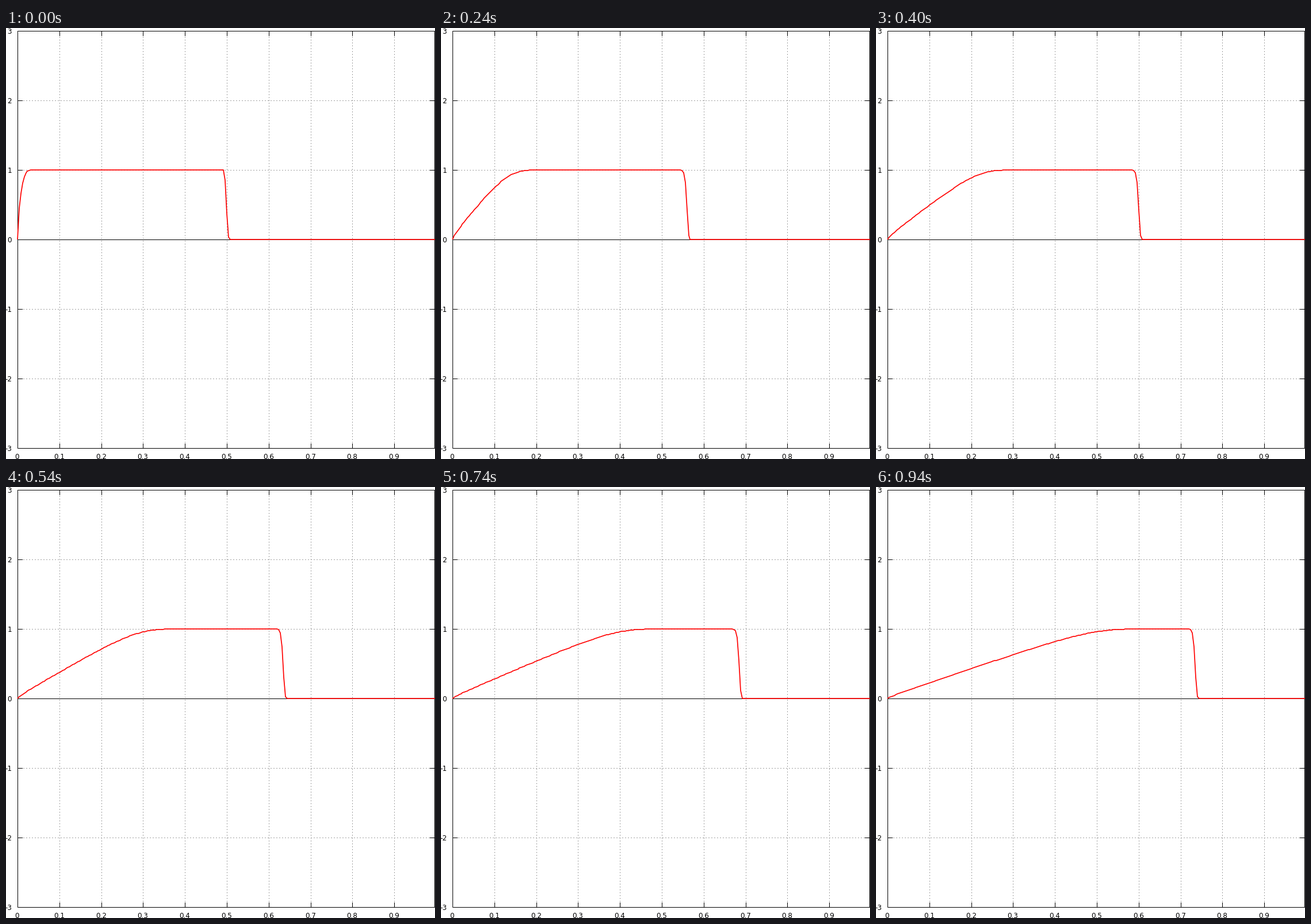
A matplotlib script that plays this animation: 746 by 750 pixels, repeating every 0.96 s.

```python
import numpy as np
import matplotlib.pyplot as plt
from matplotlib.animation import FuncAnimation

W, H, DPI = 746, 750, 100
LEFT, RIGHT, TOP, BOTTOM = 20, 745, 5, 731  # pixel columns and rows
HALF = 0.5  # from a pixel's index to its centre
PX = 72 / DPI  # points per pixel

N = 250
DX = 1 / N
DT = 0.0001
STEPS = 100  # solver steps per frame
FRAMES = 48
X_MAX = (N - 1) * DX


def to_px(x):
    return np.rint(LEFT + x / X_MAX * (RIGHT - LEFT))


def to_py(y):
    return np.rint(TOP + (3 - y) / 6 * (BOTTOM - TOP))


def solve():
    """Upwind solution of Burgers' equation, one row per frame."""
    u = np.zeros(N)
    u[1:124] = 1
    rows = []
    for _ in range(FRAMES):
        for _ in range(STEPS):
            u[1:] -= DT / DX * np.diff(u * u / 2)
        rows.append(u.copy())
    return rows


fig = plt.figure(figsize=(W / DPI, H / DPI), dpi=DPI, facecolor="white")
ax = fig.add_axes([0, 0, 1, 1])
ax.set_xlim(0, W)
ax.set_ylim(H, 0)
ax.axis("off")


def rule(xs, ys, color="black", cap="projecting", **style):
    ax.plot(np.array(xs) + HALF, np.array(ys) + HALF, color=color, lw=PX,
            snap=False, solid_capstyle=cap, dash_capstyle="butt", **style)


def label(x, y, text, ha):
    ax.text(x, y, text, ha=ha, va="baseline", color="black",
            family="DejaVu Sans", fontsize=12 * PX)


GRID = dict(color="#a0a0a0", linestyle=(0, (2, 3)), zorder=1)
TICK = 8

for i in range(10):
    x = to_px(i / 10)
    label(x - HALF, 750, f"{i / 10:g}", "center")
    if i:
        rule([x, x], [BOTTOM + HALF, TOP], **GRID)
        rule([x, x], [TOP, TOP + TICK])
        rule([x, x], [BOTTOM, BOTTOM - TICK])

for v in range(-3, 4):
    y = to_py(v)
    label(10, y + 5, str(v), "right")
    if abs(v) < 3:
        rule([LEFT - HALF, RIGHT], [y, y], **GRID)
        rule([LEFT, LEFT + TICK], [y, y])
        rule([RIGHT, RIGHT - TICK], [y, y])

rule([LEFT, RIGHT], [to_py(0)] * 2)
rule([LEFT, RIGHT, RIGHT, LEFT, LEFT], [TOP, TOP, BOTTOM, BOTTOM, TOP],
     solid_joinstyle="miter")

states = solve()
curve_x = to_px(np.arange(N) * DX)
curve_x[-1] = W
curve, = ax.plot([], [], color="#ff0000", lw=1.7 * PX, snap=False, zorder=5,
                 solid_capstyle="butt", solid_joinstyle="round")


def update(k):
    curve.set_data(curve_x, to_py(states[k]))
    return curve,


anim = FuncAnimation(fig, update, frames=FRAMES, interval=20,
                     repeat=True, repeat_delay=0)
plt.show()
```
